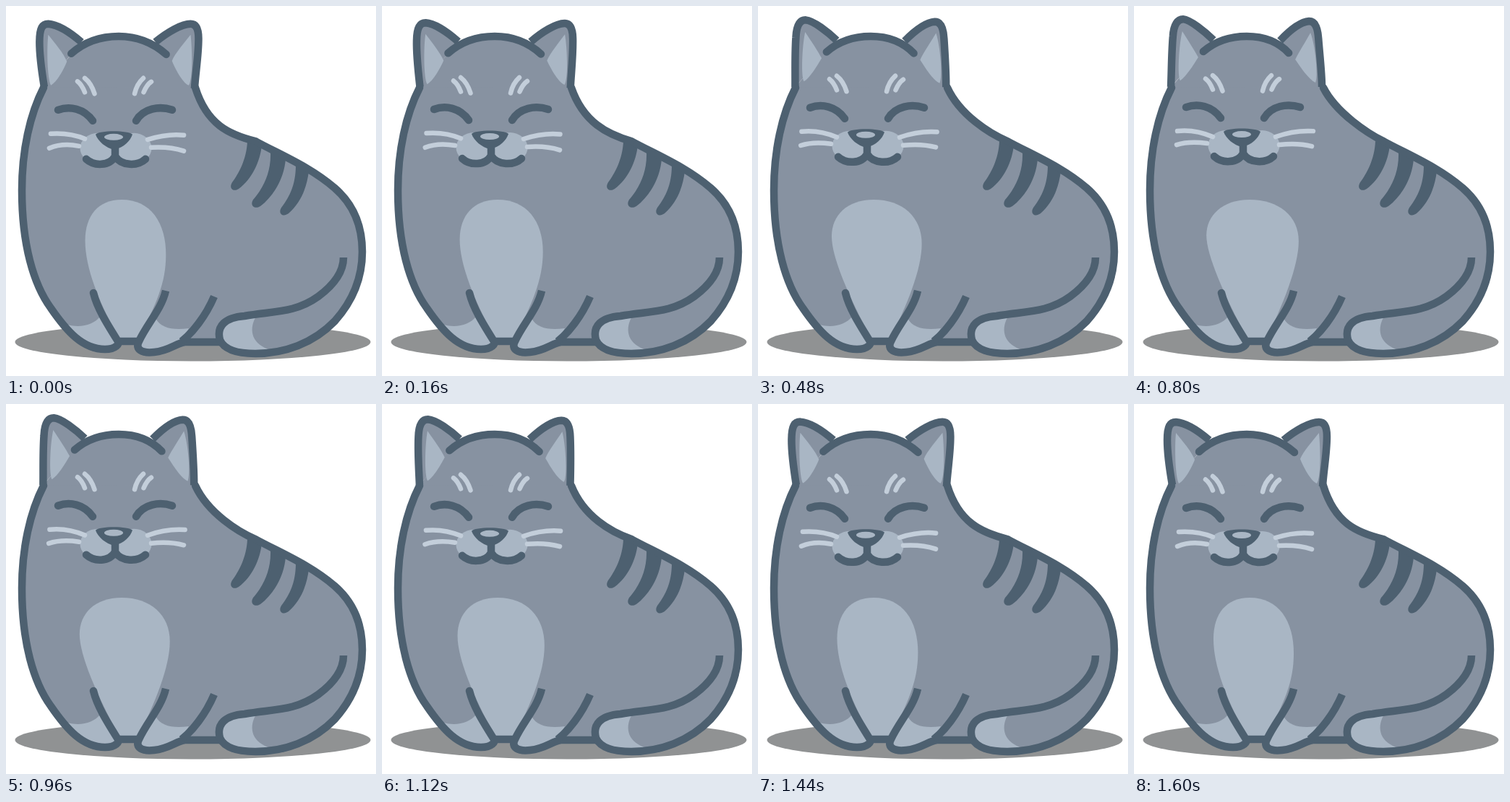
An HTML page that plays this animation: 512 by 512 pixels, repeating every 1.68 s.

```html
<!DOCTYPE html>
<html lang="en">
<head>
<meta charset="utf-8">
<title>Breathing cat</title>
<style>
  html, body { margin: 0; width: 100%; height: 100%; overflow: hidden; background: #fff; }
  svg { display: block; width: 100%; height: 100%; }
  .fur { fill: #8792a1; }
  .pale { fill: #a9b6c4; }
  .dark { fill: #4d6070; }
  .line { stroke: #4d6070; stroke-width: 10.5; stroke-linejoin: round; }
  .open { fill: none; }
  .round { stroke-linecap: round; }
  .hair { fill: none; stroke: #c3ceda; stroke-width: 6.5; stroke-linecap: round; }
</style>
</head>
<body>
<svg viewBox="0 0 512 512">
  <ellipse cx="258.5" cy="465" rx="246" ry="26.5" fill="#909293"/>

  <path class="fur" d="M50,114 L98,58 Q120,40 156,40 T212,56 L264,114Z"/>
  <path class="fur"
    d="M52,112 C33,150 22,200 22,255 C22,330 38,385 62,418 C84,450 106,475 137,475 C152,475 158,467 155,464 L184,464 C178,475 188,481 205,479 C226,477 236,466 248,465 L297,465 C305,478 325,481 345,481 C385,481 425,467 455,436 C480,408 493,375 493,340 C493,300 478,272 455,252 C420,222 380,206 345,187 C308,178 278,165 262,113Z"
    data-to="M52,112 C33,150 22,200 22,255 C22,330 38,385 62,418 C84,450 106,475 137,475 C152,475 158,467 155,464 L184,464 C178,475 188,481 205,479 C226,477 236,466 248,465 L297,465 C305,478 325,481 345,481 C385,481 425,467 455,436 C480,408 493,375 493,340 C493,300 478,272 455,252 C420,222 380,206 345,187 C325,177 280,148 262,113Z"/>

  <!-- chest, paws, tail tip -->
  <path class="pale"
    d="M160,268 C128,268 110,290 110,325 C110,362 128,410 157,461 L183,461 C208,412 221,385 221,345 C221,300 200,268 160,268Z"
    data-to="M160,268 C122,268 100,290 100,317 C100,345 125,400 157,461 L183,461 C205,415 228,360 228,325 C228,290 200,268 160,268Z"/>
  <path class="pale" d="M82,440 C100,446 120,443 131,429 L155,464 C155,470 150,475 137,475 C115,475 97,460 82,440Z"/>
  <path class="pale" d="M207,432 C214,446 232,449 253,446 L243,465 C230,472 220,479 205,479 C188,481 178,475 184,464Z"/>
  <path class="pale" d="M347,428 C336,445 338,466 363,475 L345,481 C318,480 296,474 295,452 C297,432 320,430 347,428Z"/>

  <!-- back stripes -->
  <g class="dark">
    <path d="M334,187 L354,192 C352,215 340,240 322,253 C314,258 308,252 313,244 C322,232 333,212 334,187Z"/>
    <path d="M366,203 L387,210 C386,235 372,262 352,277 C344,282 337,276 342,268 C356,252 367,230 366,203Z"/>
    <path d="M401,220 L419,229 C416,252 408,272 391,287 C383,293 376,287 381,279 C394,262 401,245 401,220Z"/>
  </g>

  <!-- ears -->
  <path class="fur line"
    d="M53,112 C50,95 46,70 46,50 C46,30 50,25 58,25 C72,26 90,38 104,50"
    data-to="M51,112 C52,90 52,65 54,42 C55,25 61,18 68,18 C78,19 98,35 110,47"/>
  <path class="fur line"
    d="M207,50 C224,36 244,25 256,25 C264,25 267,32 267,45 C267,68 262,95 261,114"
    data-to="M202,48 C215,34 230,22 242,21 C250,21 254,30 255,45 C257,70 260,95 260,112"/>
  <path class="pale"
    d="M58,40 C66,50 80,66 84,77 C80,88 70,106 62,110 C57,100 56,60 58,40Z"
    data-to="M67,35 C74,46 84,62 89,71 C82,82 72,98 64,103 C60,98 62,55 67,35Z"/>
  <path class="pale"
    d="M256,40 C248,50 234,66 230,76 C234,86 244,106 253,110 C259,100 258,60 256,40Z"
    data-to="M244,37 C238,48 228,64 223,74 C230,84 241,101 251,106 C255,98 251,55 244,37Z"/>

  <!-- outlines -->
  <g class="line open">
    <path class="round"
      d="M90,66 C108,50 130,42 156,42 C185,42 206,53 222,67"
      data-to="M96,63 C112,49 132,42 156,42 C180,42 200,50 214,65"/>
    <path class="round" d="M52,113 C33,150 22,200 22,255 C22,330 38,385 62,418 C84,450 106,475 137,475 C152,475 158,467 155,464 C140,440 126,418 121,397"/>
    <path d="M155,464 H184"/>
    <path d="M221,394 C215,420 195,440 184,464 C178,475 188,481 205,479 C226,477 236,466 248,465 H297"/>
    <path d="M288,402 C276,430 258,452 243,464"/>
    <path d="M467,348 C467,366 455,385 432,402 C400,425 370,422 330,429 C303,431 291,443 296,462 C303,478 325,481 345,481 C385,481 425,467 455,436 C480,408 493,375 493,340 C493,300 478,272 455,252 C420,222 380,206 345,187"/>
    <path class="round"
      d="M345,187 C308,178 278,165 262,113"
      data-to="M345,187 C325,177 280,148 262,113"/>
  </g>

  <!-- face -->
  <g id="face">
    <g class="hair">
      <path d="M99,104.500 Q105,109 109,119.500 M109,100 Q118,107 122.500,121.500"/>
      <path d="M201,105 Q195,109 190.500,119.500 M190,100 Q181,108 178,121.500"/>
    </g>
    <g class="line open round">
      <path d="M72,144 C88,138 108,142 120,159"/>
      <path d="M180,159 C190,142 212,138 230,144"/>
    </g>
    <ellipse class="pale" cx="127" cy="197" rx="24.500" ry="21"/>
    <ellipse class="pale" cx="177" cy="197" rx="24.500" ry="21"/>
    <path class="line open round" d="M111,212 C122,222 143,222 151,208 C160,222 182,222 193,212 M151,193 V208"/>
    <path class="dark" d="M124,178 C128,172 170,172 175,178 C172,187 163,196 150,199 C138,197 127,187 124,178Z"/>
    <ellipse class="pale" cx="149" cy="181.500" rx="13" ry="4.500"/>
  </g>
  <g class="hair">
    <path
      d="M62,177 C78,176 95,178 109,184 M60,197 C72,192 86,191 101,194"
      data-to="M60,173 C78,171 95,175 109,181 M59,192 C72,188 86,188 101,190"/>
    <path
      d="M196,185 C212,180 228,177 246,179 M201,196 C218,195 234,197 246,201"
      data-to="M196,181 C212,175 230,172 248,173 M201,192 C218,190 234,191 246,194"/>
  </g>
</svg>
<script>
  const LOOP = 1680, STEP = 80, PEAK = 725;
  const face = document.getElementById('face');
  const numbers = /-?\d+(\.\d+)?/g;

  const morphs = [...document.querySelectorAll('[data-to]')].map(el => {
    const from = el.getAttribute('d');
    const to = el.dataset.to.match(numbers).map(Number);
    return k => {
      let i = 0;
      el.setAttribute('d', from.replace(numbers, n => (+n + (to[i++] - n) * k).toFixed(2)));
    };
  });

  function draw(now) {
    const t = Math.floor(now % LOOP / STEP) * STEP;
    const breath = (1 + Math.cos((t - PEAK) / LOOP * 2 * Math.PI)) / 2;
    morphs.forEach(morph => morph(breath));
    face.setAttribute('transform', `translate(0 ${-4 * breath})`);
  }

  let start;
  function tick(now) {
    start ??= now;
    draw(now - start);
    requestAnimationFrame(tick);
  }
  draw(0);
  requestAnimationFrame(tick);
</script>
</body>
</html>
```
